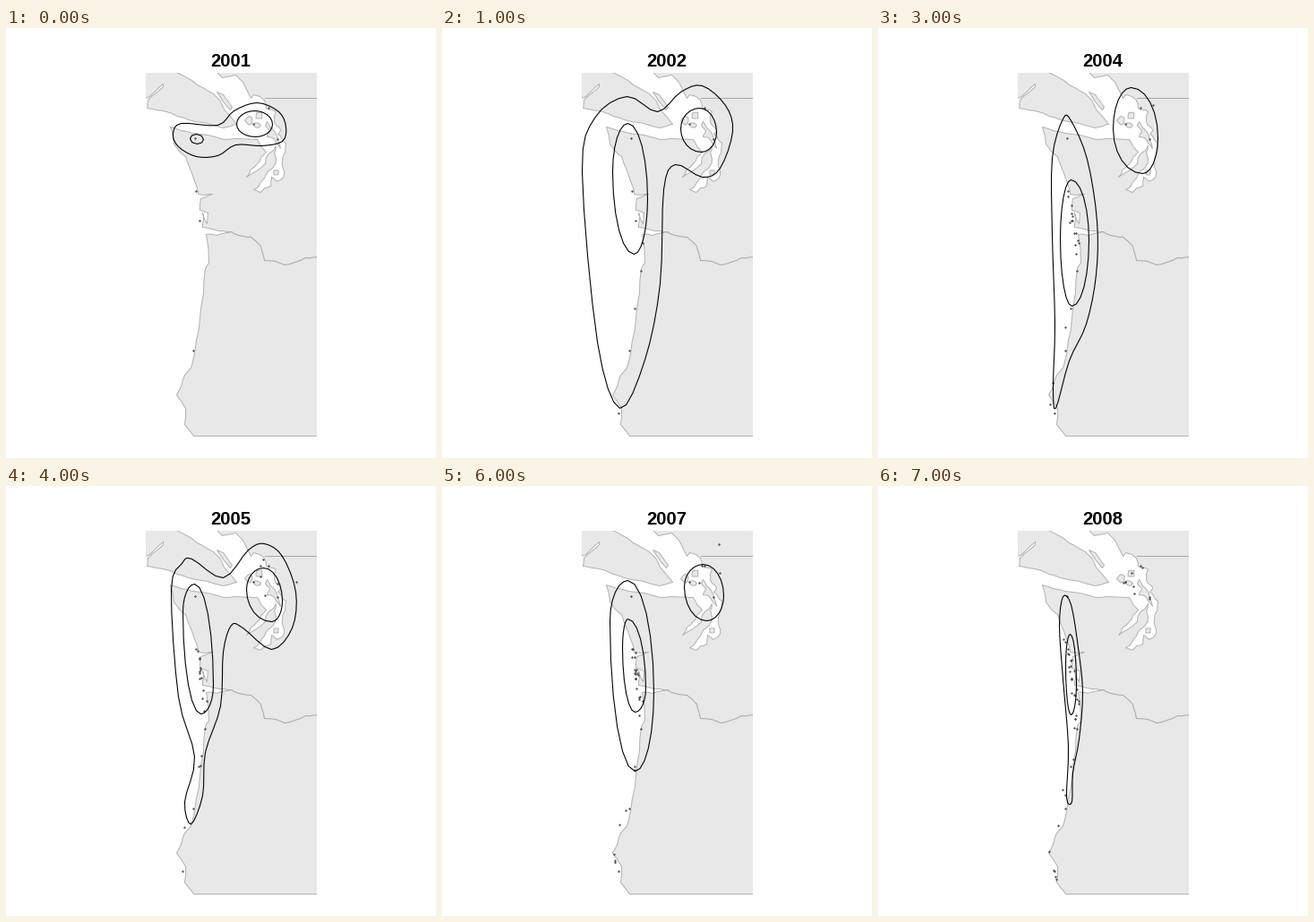
Write a matplotlib script that moves like this. It is 480 by 480 pixels and loops after 8 s.

```python
import numpy as np
import matplotlib.pyplot as plt
from matplotlib.animation import FuncAnimation
from matplotlib.patches import Polygon

SIZE = 480
PX = 0.9  # points per pixel at 80 dpi
LAND, COAST, BORDER = "#e8e8e8", "#b2b2b2", "#a8a8a8"
YEARS = range(2001, 2009)

rng = np.random.default_rng(4)
fig = plt.figure(figsize=(6, 6), dpi=80, facecolor="white")
# The axes are the map window, so everything is clipped to it
ax = fig.add_axes([156 / SIZE, 24 / SIZE, 191 / SIZE, 406 / SIZE])
ax.set_xlim(155.5, 346.5)
ax.set_ylim(455.5, 49.5)
ax.axis("off")
layers = {year: [] for year in YEARS}


def pairs(values):
    return np.reshape(values, (-1, 2)).astype(float)


def rough(values, amount=0.06, rounds=2):
    """Break each segment at a randomly displaced midpoint."""
    pts = pairs(values)
    for _ in range(rounds):
        step = np.diff(pts, axis=0)
        normal = step[:, ::-1] * (-1, 1)
        shift = rng.normal(0, amount, (len(step), 1)).clip(-0.12, 0.12)
        mid = pts[:-1] + step / 2 + normal * shift
        pts = np.vstack([np.stack([pts[:-1], mid], 1).reshape(-1, 2), pts[-1:]])
    return pts


def smooth(pts, steps=4):
    """Closed Catmull-Rom curve through the points."""
    a, b, c, d = (np.roll(pts, k, axis=0)[:, None] for k in (1, 0, -1, -2))
    t = np.linspace(0, 1, steps, endpoint=False)[None, :, None]
    curve = 0.5 * (2 * b + (c - a) * t + (2 * a - 5 * b + 4 * c - d) * t**2
                   + (3 * b - a - 3 * c + d) * t**3)
    return curve.reshape(-1, 2)


def land(pts):
    ax.add_patch(Polygon(pts, fc=LAND, ec=COAST, lw=PX, joinstyle="round"))


def contour(year, pts):
    line = Polygon(pts, fill=False, ec="black", lw=1.1 * PX, zorder=4,
                   joinstyle="round")
    layers[year].append(ax.add_patch(line))


def loop(year, *xy):
    contour(year, smooth(pairs(xy)))


def oval(year, top, right, bottom, left, steps=6):
    """Quarter ellipses joining the four outermost points."""
    s, c = (f(np.linspace(0, np.pi / 2, steps + 1))[:-1] for f in (np.sin, np.cos))
    parts = []
    for a, b, upright in ((top, right, True), (right, bottom, False),
                          (bottom, left, True), (left, top, False)):
        if upright:
            x, y = a[0] + (b[0] - a[0]) * s, b[1] + (a[1] - b[1]) * c
        else:
            x, y = b[0] + (a[0] - b[0]) * c, a[1] + (b[1] - a[1]) * s
        parts.append(np.column_stack([x, y]))
    contour(year, np.vstack(parts))


KNOWN = pairs((210, 122, 275, 106, 292, 88, 302, 123, 211, 181, 215, 214, 208, 359,
               223, 239, 221, 270, 214, 312, 196, 429))
SHORE_Y = (110, 180, 240, 310, 385, 409, 430, 455)
SHORE_X = (184, 212, 222, 217, 199, 192, 197, 204)


def sites(year, known, shore, bay):
    """Known places, then random ones along the shore and in the bay."""
    spread = rng.uniform(160, 440, shore)
    y = np.where(np.arange(shore) % 5 < 3, rng.normal(212, 22, shore), spread)
    x = np.interp(y, SHORE_Y, SHORE_X) + rng.normal(-1, 1.5, shore)
    inland = rng.normal((292, 110), (13, 16), (bay, 2))
    pts = np.vstack([KNOWN[:known], np.column_stack([x, y]), inland])
    dots, = ax.plot(*pts.T, "o", ms=1.5 * PX, mfc="#777777", mec="#222222",
                    mew=0.6 * PX, zorder=3)
    layers[year].append(dots)


# Mainland, from north to south
strait = (350, 45, 231, 45, 241, 55, 256, 52, 264, 60, 273, 78, 276, 74, 283, 76)
sound = (288, 80, 290, 89, 301, 93, 299, 104, 306, 113, 303, 118, 312, 128, 308, 148,
         310, 164, 302, 171, 296, 166, 295, 176, 283, 183, 276, 180, 288, 167,
         298, 155, 301, 146, 301, 131, 289, 151, 268, 166, 280, 151, 290, 138, 280, 124)
shore = (254, 123, 243, 124, 208, 117, 183, 110, 187, 129, 200, 143, 213, 178,
         214, 185, 230, 185, 217, 190, 216, 203, 225, 206, 224, 218, 219, 206,
         219, 222, 233, 225, 252, 227, 234, 231, 223, 230, 226, 262, 222, 268,
         216, 323, 207, 376, 199, 387, 190, 409, 200, 424, 199, 442, 209, 455)
land(np.vstack([pairs(strait), rough(sound, 0.1), rough(shore, 0.03), [(350, 455)]]))

# Islands
land(rough((150, 45, 183, 45, 207, 58, 231, 73, 257, 107, 242, 111, 203, 102, 179, 93,
            157, 89, 158, 80, 175, 65, 175, 62, 160, 76, 150, 79), 0.03))
land(pairs((235, 71, 242, 74, 252, 88, 250, 91, 243, 83)))
land(rough((291, 104, 300, 116, 306, 134, 297, 122, 291, 121, 294, 115, 289, 108)))
for x, y, r in ((282, 97, 4), (271, 103, 4), (280, 108, 3), (301, 161, 3)):
    angle = np.linspace(0, 2 * np.pi, 8, endpoint=False)
    radius = r * rng.uniform(0.7, 1.3, 8)
    land(np.column_stack([x + radius * np.cos(angle), y + radius * np.sin(angle)]))

# Borders
river = (252, 228, 273, 233, 284, 243, 288, 259, 311, 264, 334, 256, 350, 255)
for line in (pairs((288, 77, 350, 77)), rough(river, 0.04)):
    ax.plot(*line.T, color=BORDER, lw=PX)

loop(2001, 186, 118, 195, 106, 236, 108, 254, 92, 280, 83, 304, 93, 312, 110,
     308, 126, 285, 131, 256, 130, 236, 142, 212, 143, 192, 132)
oval(2001, (277, 92), (297, 107), (278, 121), (257, 107))
oval(2001, (212, 118), (220, 124), (213, 129), (205, 123), steps=2)
sites(2001, 7, 0, 0)

loop(2002, 156, 160, 170, 100, 206, 76, 240, 93, 266, 71, 290, 64, 316, 86, 324, 115,
     310, 156, 290, 166, 260, 152, 247, 180, 243, 285, 226, 370, 198, 424, 173, 350)
oval(2002, (207, 106), (229, 190), (214, 252), (190, 160))
oval(2002, (287, 89), (306, 116), (289, 138), (266, 112))
sites(2002, 11, 0, 0)

loop(2003, 206, 68, 214, 67, 236, 89, 243, 120, 242, 200, 236, 300, 222, 355,
     206, 380, 196, 330, 193, 230, 183, 130, 192, 87)
loop(2003, 207, 100, 215, 100, 224, 117, 226, 160, 225, 230, 224, 252, 215, 264,
     207, 215, 197, 150, 197, 123)
oval(2003, (287, 43), (328, 115), (295, 180), (250, 113))
oval(2003, (290, 72), (314, 113), (291, 154), (269, 110))
sites(2003, 11, 4, 2)

loop(2004, 206, 101, 215, 103, 233, 146, 244, 215, 243, 275, 232, 330, 213, 371,
     198, 424, 195, 400, 197, 330, 194, 230, 194, 145)
oval(2004, (215, 169), (235, 237), (216, 310), (203, 235))
oval(2004, (282, 66), (312, 122), (295, 162), (262, 112))
sites(2004, 11, 14, 1)

loop(2005, 184, 115, 196, 86, 207, 81, 242, 102, 270, 71, 288, 64, 308, 78, 323, 118,
     319, 158, 296, 182, 264, 158, 251, 155, 242, 185, 239, 245, 222, 297, 219, 345,
     206, 377, 199, 352, 210, 302, 192, 235)
oval(2005, (210, 109), (231, 222), (217, 254), (197, 140))
oval(2005, (287, 91), (308, 128), (296, 151), (268, 115))
sites(2005, 11, 14, 6)

oval(2006, (207, 98), (242, 222), (216, 297), (185, 150))
oval(2006, (207, 139), (231, 216), (217, 249), (197, 175))
oval(2006, (298, 68), (328, 118), (304, 169), (264, 112))
oval(2006, (298, 94), (314, 116), (300, 141), (285, 115))
sites(2006, 11, 28, 9)

oval(2007, (207, 105), (236, 230), (215, 318), (187, 150))
oval(2007, (207, 148), (227, 225), (215, 252), (201, 180))
oval(2007, (291, 87), (314, 122), (295, 150), (270, 112))
sites(2007, 11, 24, 4)

loop(2008, 206, 123, 215, 132, 223, 180, 228, 230, 224, 282, 217, 320, 216, 352,
     210, 347, 212, 290, 206, 215, 202, 155)
oval(2008, (214, 165), (221, 220), (215, 255), (209, 200))
sites(2008, 11, 30, 7)

title = fig.text(250.5 / SIZE, 1 - 42.8 / SIZE, "", family="Liberation Sans",
                 weight="bold", size=20.3 * PX, ha="center", va="baseline")


def draw(frame):
    title.set_text(str(YEARS[frame]))
    for year, artists in layers.items():
        for artist in artists:
            artist.set_visible(year == YEARS[frame])
    return [title]


anim = FuncAnimation(fig, draw, frames=len(YEARS), interval=1000, repeat=True,
                     repeat_delay=0, blit=False)
plt.show()
```
